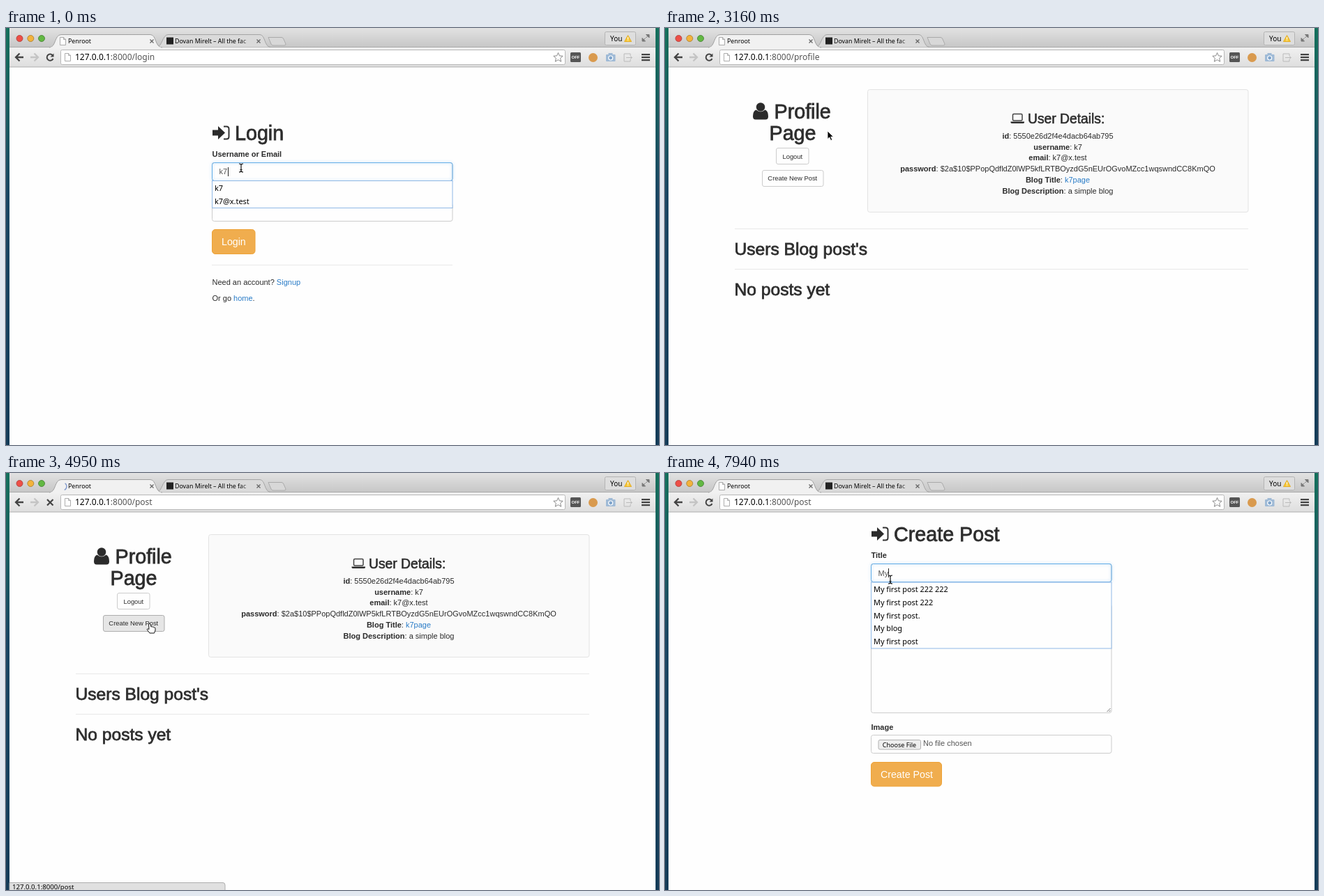
Recreate the animation shown at these times as an HTML page. Size 936x599 px, loop 8 s.

```html
<!DOCTYPE html>
<html lang="en">
<head>
<meta charset="utf-8">
<title>Blog walkthrough</title>
<style>
html, body { margin: 0; width: 100%; height: 100%; overflow: hidden; }
svg { display: block; font: 11px "Liberation Sans", Arial, sans-serif; fill: #2b2b2b; }
.ui { font-family: "Noto Sans", sans-serif; font-weight: 500; fill: #000; }
.tab { font-size: 8.8px; }
.url { font-size: 12px; }
.list { font-size: 10.9px; }
.b { font-weight: bold; }
.h { stroke: #333; stroke-width: .8px; }
.h1 { font-size: 28.7px; }
.h2 { font-size: 24.6px; }
.h3 { font-size: 19.3px; stroke-width: .6px; }
.sm { font-size: 9.4px; }
.mid { text-anchor: middle; }
.lg { font-size: 14.2px; fill: #fff; }
.a { fill: #2a7cc7; }
.val { fill: #555; }
.box { fill: #fefefe; stroke: #ccc; }
.orange { fill: #f0ad4e; stroke: #eea236; }
.focus { fill: none; stroke: #66afe9; filter: drop-shadow(0 0 2px rgba(102,175,233,.7)); }
.drop { fill: #fefefe; stroke: #8fb8e6; }
.rule { stroke: #e8e8e8; }
.line { fill: none; stroke: #444; }
.caret { fill: #222; }
</style>
</head>
<body>
<svg width="936" height="599" viewBox="0 0 936 599">
<defs>
  <linearGradient id="sea" x2="0" y2="1">
    <stop stop-color="#14705c"/><stop offset=".2" stop-color="#1a5c60"/>
    <stop offset=".4" stop-color="#1a4663"/><stop offset="1" stop-color="#153c58"/>
  </linearGradient>
  <linearGradient id="strip" x2="0" y2="1"><stop stop-color="#e2e2e2"/><stop offset="1" stop-color="#c6c6c6"/></linearGradient>
  <linearGradient id="bar" x2="0" y2="1"><stop stop-color="#f1f1f1"/><stop offset="1" stop-color="#dedede"/></linearGradient>
  <linearGradient id="fade"><stop stop-color="#dadada" stop-opacity="0"/><stop offset="1" stop-color="#dadada"/></linearGradient>
  <g id="enter">
    <path d="M296 146.500h8v-5.500l10 9.500-10 9.500v-5.500h-8z"/>
    <path d="M312 141.500h4q3.500 0 3.500 3.500v11q0 3.500-3.500 3.500h-4" fill="none" stroke="#333" stroke-width="2"/>
  </g>
  <path id="sheet" d="M.5.500h5l3 3v8h-8zM5.500.500v3h3" fill="#fff" stroke="#999" stroke-width=".8"/>
  <path id="cross" d="M0 0l5 5m0-5l-5 5" stroke="#666" stroke-width="1.300"/>
</defs>

<!-- desktop and window -->
<rect width="936" height="599" fill="url(#sea)"/>
<rect x="5" width="926" height="599" fill="#fefefe"/>
<rect x="5" width="926" height="28" fill="url(#strip)"/>
<rect x="5" y="27" width="926" height="29" fill="url(#bar)"/>
<path d="M5 27.500H931" stroke="#aaa"/>
<path d="M5 56H931" stroke="#aeaeae"/>
<g stroke-width=".8">
  <circle cx="19.500" cy="15" r="4.500" fill="#ee4f47" stroke="#a93a35"/>
  <circle cx="35.300" cy="15" r="4.500" fill="#f3b33c" stroke="#a97a2a"/>
  <circle cx="51" cy="15" r="4.500" fill="#62b843" stroke="#437e31"/>
</g>

<!-- tabs -->
<path d="M216 27.500C224 27 224 10 232 9.500H364C372 10 370 27 379 27.500" fill="#dadada" stroke="#a5a5a5"/>
<path d="M376 13.500H395Q397 13.500 398 16L401 23Q401 25 399 25H383Q381 25 380 23Z" fill="#d8d8d8" stroke="#aaa"/>
<path d="M62 28C72 27.500 69 10 79 9.500H207C216 10 213 27.500 224 28" fill="#f1f1f1" stroke="#a0a0a0"/>
<path d="M64 28.500H222" stroke="#f1f1f1" stroke-width="2"/>
<use id="tabSheet" href="#sheet" x="77" y="13"/>
<path id="spin" d="M79 14.500A5.500 5.500 0 0 1 86.800 20" fill="none" stroke="#8099cc" stroke-width="1.300"/>
<text class="ui tab" x="89" y="22">Penroot</text>
<use href="#cross" x="206.500" y="16.500"/>
<rect x="230" y="13.500" width="10" height="10" fill="#222"/>
<text class="ui tab" x="242" y="22">Dovan Mirelt – All the fac</text>
<rect x="336" y="12" width="18" height="14" fill="url(#fade)"/>
<rect x="353" y="12" width="5" height="14" fill="#dadada"/>
<use href="#cross" x="359.500" y="16.500"/>
<rect x="858.500" y="5.500" width="44" height="19" rx="2" fill="#dedede" stroke="#b4b4b4"/>
<text class="ui" x="866" y="19" font-size="10">You</text>
<path d="M891.500 10.500l5 9h-10z" fill="#f8c93a" stroke="#e3ad26" stroke-linejoin="round"/>
<path d="M891.500 13v3.500m0 1v1" stroke="#fff"/>
<path d="M917.500 9.500h4.500v4.500zM912 14.500v4.500h4.500zM921 10.500l-3.500 3.500M913 18l3.500-3.500" fill="#777" stroke="#777"/>

<!-- toolbar -->
<path d="M25 42H15M19.500 36.500L14 42l5.500 5.500" fill="none" stroke="#444" stroke-width="2.300"/>
<path d="M35 42H45M40.500 36.500L46 42l-5.500 5.500" fill="none" stroke="#c4c4c4" stroke-width="2.300"/>
<g id="reload"><path d="M67 39.500A4.600 4.600 0 1 0 67.500 44" fill="none" stroke="#444" stroke-width="2"/><path d="M68.500 36.500v5h-5z" fill="#444"/></g>
<path id="stop" d="M59 38l8.500 8.500m0-8.500L59 46.500" stroke="#444" stroke-width="2.200"/>
<rect x="78.500" y="31.500" width="723" height="21" rx="2" fill="#fff" stroke="#b8b8b8"/>
<use href="#sheet" x="84" y="36"/>
<text class="ui url" x="99" y="46">127.0.0.1<tspan fill="#555">:8000/<tspan id="path"></tspan></tspan></text>
<path d="M791.500 35.500l1.900 4.400 4.800.400-3.600 3.200 1.100 4.700-4.200-2.500-4.200 2.500 1.100-4.700-3.600-3.200 4.800-.400z" fill="#fff" stroke="#888"/>
<rect x="809" y="35" width="15" height="14" rx="1.500" fill="#555"/>
<text x="816.500" y="44.300" class="mid" font-size="6" font-weight="bold" fill="#fff">OFF</text>
<circle cx="841.500" cy="42.500" r="6.500" fill="#d99a4e"/>
<g fill="#9fbad6"><rect x="860" y="38" width="13.500" height="10" rx="1"/><rect x="863.500" y="36" width="6" height="3"/></g>
<circle cx="866.700" cy="43" r="3" fill="#7fa4cb" stroke="#fff" stroke-width="1.200"/>
<path d="M895 40v-3h-9v11h9v-3M889 42.500h8M895 40.500l2.500 2-2.500 2" fill="none" stroke="#bbb"/>
<path d="M911 38.200h12m-12 4h12m-12 4h12" stroke="#444" stroke-width="2.200"/>

<!-- login page -->
<g id="login">
  <use href="#enter"/>
  <text class="h h1" x="328" y="161">Login</text>
  <text class="b" x="295.500" y="185">Username or Email</text>
  <rect class="box" x="295.500" y="193.500" width="344.500" height="26" rx="3"/>
  <rect class="focus" id="userFocus" x="295.500" y="193.500" width="344.500" height="26" rx="3"/>
  <text class="val" x="305.500" y="210">k7</text>
  <text class="b" x="295.500" y="243">Password</text>
  <rect class="box" x="295.500" y="251.500" width="344.500" height="26" rx="3"/>
  <rect class="focus" id="passFocus" x="295.500" y="251.500" width="344.500" height="26" rx="3"/>
  <g id="dots" fill="#444"></g>
  <rect class="caret" id="passCaret" y="258" width="1" height="13"/>
  <g id="userList">
    <rect class="caret" x="318" y="200" width="1" height="13"/>
    <rect class="drop" x="295.500" y="219.500" width="344.500" height="39"/>
    <text class="ui list" x="299" y="234">k7</text>
    <text class="ui list" x="299" y="252.500">k7@x.test</text>
  </g>
  <rect class="orange" x="295.500" y="289.500" width="61.500" height="35" rx="4.500"/>
  <text class="lg" x="309" y="312">Login</text>
  <path class="rule" d="M295 340.500H640"/>
  <text x="295.500" y="368.500">Need an account? <tspan class="a">Signup</tspan></text>
  <text x="295.500" y="392">Or go <tspan class="a">home</tspan>.</text>
</g>

<!-- profile page -->
<g id="profile">
  <circle cx="137" cy="113.500" r="6.300"/>
  <path d="M130.500 117.500Q126 119 126 127Q126 131.500 130 131.500H144Q148 131.500 148 127Q148 119 143.500 117.500Q137 123 130.500 117.500Z"/>
  <text class="h h1" x="156.500" y="129.500">Profile</text>
  <text class="h h1 mid" x="183" y="160.500">Page</text>
  <rect class="box" x="159.500" y="172.500" width="46.500" height="23" rx="2.500"/>
  <text class="sm mid" x="182.800" y="187.500">Logout</text>
  <rect class="box" id="newPost" x="139.500" y="204.500" width="87.500" height="23" rx="2.500"/>
  <text class="sm mid" x="182.800" y="219">Create New Post</text>
  <rect x="290.500" y="88.500" width="545.500" height="176" rx="3" fill="#fafafa" stroke="#e3e3e3"/>
  <rect class="line" x="498.500" y="123.500" width="13.500" height="9.500" rx="1.500" stroke-width="1.500"/>
  <path d="M495.500 134.500h19.500v1q0 1.500-2 1.500h-15.500q-2 0-2-1.500z"/>
  <text class="h h3" x="520" y="136.500">User Details:</text>
  <g class="mid">
    <text x="563" y="159"><tspan class="b">id</tspan>: 5550e26d2f4e4dacb64ab795</text>
    <text x="563" y="174.700"><tspan class="b">username</tspan>: k7</text>
    <text x="563" y="190.400"><tspan class="b">email</tspan>: k7@x.test</text>
    <text x="563" y="206"><tspan class="b">password</tspan>: $2a$10$PPopQdfldZ0lWP5kfLRTBOyzdG5nEUrOGvoMZcc1wqswndCC8KmQO</text>
    <text x="563" y="221.800"><tspan class="b">Blog Title</tspan>: <tspan class="a">k7page</tspan></text>
    <text x="563" y="237.500"><tspan class="b">Blog Description</tspan>: a simple blog</text>
  </g>
  <path class="rule" d="M100 288.500H836M100 346.500H836"/>
  <text class="h h2" x="99.500" y="326">Users Blog post's</text>
  <text class="h h2" x="99.500" y="384">No posts yet</text>
  <g id="status">
    <path d="M5 588.500H311Q314 588.500 314 592V600H5Z" fill="#e0e0e0" stroke="#adadad"/>
    <text class="ui" x="9" y="598" font-size="9.600">127.0.0.1:8000/post</text>
  </g>
</g>

<!-- new post page -->
<g id="post">
  <use href="#enter" y="-63"/>
  <text class="h h1" x="328" y="98">Create Post</text>
  <text class="b" x="295.500" y="122">Title</text>
  <rect class="box" x="295.500" y="130.500" width="344.500" height="26" rx="3"/>
  <rect class="focus" id="titleFocus" x="295.500" y="130.500" width="344.500" height="26" rx="3"/>
  <text class="val" id="title" x="305.500" y="147.500"></text>
  <rect class="caret" id="titleCaret" y="137" width="1" height="13"/>
  <text class="b" x="295.500" y="180">Content</text>
  <rect class="box" x="295.500" y="188.500" width="344.500" height="156" rx="3"/>
  <path d="M633.500 343l5-5m-2 5l2-2" stroke="#777"/>
  <text class="b" x="295.500" y="368.500">Image</text>
  <rect class="box" x="295.500" y="376.500" width="344.500" height="26" rx="3"/>
  <rect x="306" y="383.500" width="60.500" height="13.500" rx="2" fill="#eee" stroke="#b0b0b0"/>
  <text class="ui mid" x="336" y="394" font-size="9">Choose File</text>
  <text class="val" x="370" y="392">No file chosen</text>
  <rect class="orange" x="295.500" y="415.500" width="101" height="34.500" rx="4.500"/>
  <text class="lg" x="309" y="437.500">Create Post</text>
  <g id="titleList"><rect class="drop" x="295.500" y="157" width="344.500" height="95"/></g>
</g>

<!-- pointers, hot spot at 0,0 -->
<g id="beam"><path d="M-3-6q3 0 3 2v8q0 2-3 2M3-6q-3 0-3 2v8q0 2 3 2M-1.500 2.500h3" fill="none" stroke="#111" stroke-width="1.200"/></g>
<path id="arrow" d="M0 0V11.500L2.700 9 4.700 13.500 6.700 12.600 4.700 8.300H8.300Z" fill="#000" stroke="#fff" stroke-width=".8"/>
<path id="hand" d="M-1.500 1Q0-.800 1 1L2 5Q3.500 4 4.300 5.300Q5.800 4.500 6.500 6Q8 5.500 8 7.500V10L6.500 14H0L-3.500 9.500Q-4.500 7-1 8.500Z" fill="#fff" stroke="#111"/>
</svg>
<script>
const LOOP = 8000;
const $ = id => document.getElementById(id);
const show = (id, on) => { $(id).style.display = on ? '' : 'none'; };
// latest entry of [time, ...values] that has begun
const at = (keys, t) => keys.filter(k => k[0] <= t).pop();
const between = (t, a, b) => t >= a && t < b;

const pointer = [
  [0, 'beam', 337, 201], [2860, 'arrow', 308, 202], [3010, 'arrow', 239, 155],
  [3160, 'arrow', 233, 148], [3310, 'arrow', 214, 195], [3460, 'hand', 208, 210],
  [3610, 'hand', 207, 214], [3900, 'hand', 206, 216], [5100, 'arrow', 206, 216],
  [5250, 'arrow', 252, 168], [5400, 'arrow', 309, 117], [5550, 'beam', 320, 137],
  [5700, 'beam', 323, 150], [5850, 'beam', 323, 153]
];
const pages = [[0, 'login'], [2710, 'profile'], [5100, 'post']];
const paths = [[0, 'login'], [2410, 'profile'], [4650, 'post']];
const typed = [[0, '', 306], [7640, 'M', 315], [7940, 'My', 320]];
const keysHit = [1210, 1360, 1660, 1810, 2110];

$('dots').innerHTML = keysHit.map((_, i) => `<circle cx="${307.8 + i * 3.85}" cy="264.5" r="1.5"/>`).join('');
const entries = ['My first post 222 222', 'My first post 222', 'My first post.', 'My blog', 'My first post'];
$('titleList').innerHTML += entries.map((s, i) =>
  `<text class="ui list" x="299" y="${171 + i * 18.8}">${s}</text>`).join('');

function draw(t) {
  const page = at(pages, t)[1];
  for (const p of pages) show(p[1], p[1] === page);
  $('path').textContent = at(paths, t)[1];

  const loading = between(t, 2410, 2710) || between(t, 4650, 5100);
  show('stop', loading);
  show('reload', !loading);
  show('spin', loading);
  show('tabSheet', !loading);
  const turn = t < 4000 ? t - 2410 : t - 4800;
  $('spin').setAttribute('transform', `rotate(${Math.floor(turn / 150) * 60} 81.5 19.5)`);

  show('userList', t < 290);
  const swap = at([[0, 0], [290, .5], [470, 1]], t)[1];
  $('userFocus').style.opacity = 1 - swap;
  $('passFocus').style.opacity = swap;
  const count = keysHit.filter(k => k <= t).length;
  [...$('dots').children].forEach((d, i) => { d.style.display = i < count ? '' : 'none'; });
  $('passCaret').setAttribute('x', Math.floor(306 + count * 3.75));
  show('passCaret', t >= 290 && !between(t, 1070, 1210));

  const hover = t >= 3460;
  show('status', hover);
  $('newPost').style.fill = hover ? '#e6e6e6' : '';
  $('newPost').style.stroke = hover ? '#adadad' : '';

  $('titleFocus').style.opacity = at([[0, 0], [5850, .5], [5990, 1]], t)[1];
  const [, text, caretX] = at(typed, t);
  $('title').textContent = text;
  $('titleCaret').setAttribute('x', caretX);
  show('titleCaret', t >= 5850 && !between(t, 6590, 7040) && !between(t, 7490, 7640));
  show('titleList', t >= 7790);

  const [, shape, x, y] = at(pointer, t);
  for (const s of ['beam', 'arrow', 'hand']) show(s, s === shape);
  $(shape).setAttribute('transform', `translate(${x} ${y})`);
}

const start = performance.now();
function tick() {
  draw((performance.now() - start) % LOOP);
  requestAnimationFrame(tick);
}
tick();
</script>
</body>
</html>
```
